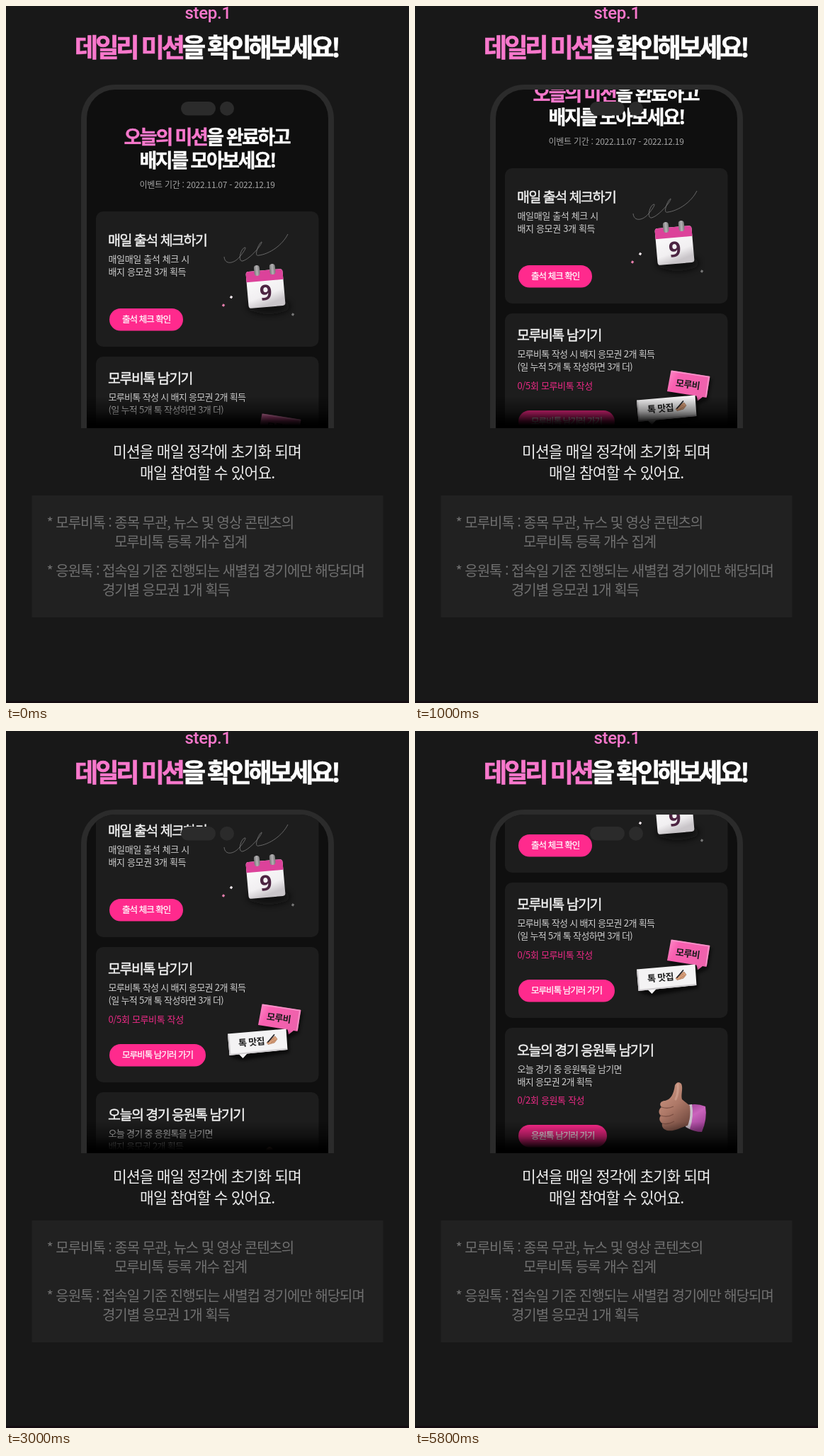
Write an HTML page that moves like this. It is 569x984 px and loops after 7 s.

```html
<!DOCTYPE html>
<html lang="ko">
<head>
<meta charset="utf-8">
<title>Daily mission</title>
<style>
  html, body { margin: 0; width: 100%; height: 100%; overflow: hidden; background: #181818; }
  svg { display: block; width: 569px; height: 984px; }
  text { font-family: "Noto Sans CJK KR", "Noto Sans CJK", "Noto Sans CJK JP", sans-serif; white-space: pre; }
  .step { font: 500 24px Roboto, sans-serif; letter-spacing: -.3px; fill: #f878cc; }
  .head { font-size: 36px; font-weight: 900; letter-spacing: -3.95px; fill: #fff; stroke: #fff; stroke-width: .7px; }
  .sub { font-size: 27px; font-weight: 900; letter-spacing: -2.5px; fill: #fff; stroke: #fff; stroke-width: .4px; }
  .pink { fill: #f878cc; stroke: #f878cc; }
  .date { font-size: 12px; font-weight: 350; letter-spacing: -.26px; fill: #a3a3a3; }
  .title { font-size: 19.5px; font-weight: 500; letter-spacing: -1.5px; fill: #f4f4f4; stroke: #f4f4f4; stroke-width: .4px; }
  .desc { font-size: 13px; font-weight: 350; letter-spacing: -.67px; fill: #cfcfcf; }
  .wide { letter-spacing: -.35px; }
  .count { font-size: 13px; font-weight: 400; letter-spacing: -.35px; fill: #ec2a86; }
  .btn { font-size: 12.5px; font-weight: 500; letter-spacing: -.95px; fill: #fff; stroke: #fff; stroke-width: .25px; }
  .tag { font-size: 13px; font-weight: 700; letter-spacing: -.6px; fill: #1c1c1c; }
  .nine { font: 700 30px "Noto Sans", sans-serif; fill: #4c2442; }
  .caption { font-size: 21.5px; font-weight: 350; letter-spacing: -.9px; fill: #ededed; }
  .note { font-size: 20px; font-weight: 350; letter-spacing: -1.05px; fill: #707070; }
</style>
</head>
<body>
<svg viewBox="0 0 569 984">
  <defs>
    <clipPath id="screen"><path d="M114 596V158a40 40 0 0 1 40-40H415a40 40 0 0 1 40 40V596Z"/></clipPath>
    <linearGradient id="fade" x2="0" y2="1">
      <stop offset="0" stop-color="#000" stop-opacity="0"/>
      <stop offset=".5" stop-color="#000" stop-opacity=".42"/>
      <stop offset=".85" stop-color="#000" stop-opacity=".88"/>
      <stop offset="1" stop-color="#000"/>
    </linearGradient>
    <linearGradient id="paper" x2=".3" y2="1">
      <stop offset="0" stop-color="#fff"/><stop offset=".75" stop-color="#f1eff1"/><stop offset="1" stop-color="#c9c5c9"/>
    </linearGradient>
    <linearGradient id="rose" x2="1" y2=".4">
      <stop offset="0" stop-color="#ff93cb"/><stop offset=".3" stop-color="#f95fb0"/><stop offset="1" stop-color="#ee62ac"/>
    </linearGradient>
    <linearGradient id="ring" x2="1">
      <stop offset="0" stop-color="#777"/><stop offset=".5" stop-color="#b5b3b5"/><stop offset="1" stop-color="#777"/>
    </linearGradient>
    <linearGradient id="skin" x1=".2" y1="0" x2=".75" y2="1">
      <stop offset="0" stop-color="#cf9a86"/><stop offset=".5" stop-color="#ad7867"/><stop offset="1" stop-color="#6d463c"/>
    </linearGradient>
    <linearGradient id="cuff" x2=".4" y2="1">
      <stop offset="0" stop-color="#9c3f93"/><stop offset=".45" stop-color="#cb64bd"/><stop offset="1" stop-color="#9c3f93"/>
    </linearGradient>
    <filter id="soft" x="-50%" y="-50%" width="200%" height="200%"><feGaussianBlur stdDeviation="5"/></filter>
    <filter id="blur" x="-30%" y="-30%" width="160%" height="160%"><feGaussianBlur stdDeviation="2"/></filter>
  </defs>

  <rect width="569" height="984" fill="#181818"/>
  <rect y="981" width="569" height="3" fill="#140c11"/>
  <text class="step" x="252.5" y="17.5">step.1</text>
  <text class="head" x="97" y="71.5"><tspan class="pink">데일리 미션</tspan>을 확인해보세요!</text>

  <path d="M106 596V159a48 48 0 0 1 48-48H415a48 48 0 0 1 48 48V596Z" fill="#2b2b2b"/>
  <g clip-path="url(#screen)">
    <rect x="114" y="118" width="341" height="478" fill="#0f0f0f"/>
    <g id="page">
      <text class="sub" x="166.5" y="195"><tspan class="pink">오늘의 미션</tspan>을 완료하고</text>
      <text class="sub" x="188.5" y="227.5">배지를 모아보세요!</text>
      <text class="date" x="188.5" y="256.5">이벤트 기간 : 2022.11.07 - 2022.12.19</text>
      <g id="cards"></g>

      <g id="calendar">
        <path d="M308 354C309 366 322 364 330 354C336 347 340 340 337 341C331 343 327 361 334 360C345 357 362 336 361 333C357 334 349 355 357 352C372 350 390 338 398 322" fill="none" stroke="#7c7c7c" stroke-width=".8"/>
        <ellipse cx="371" cy="424" rx="30" ry="11" fill="#090909" opacity=".8" filter="url(#soft)"/>
        <g transform="translate(366.5 399) rotate(-5)">
          <rect x="-26" y="-26" width="52" height="52" rx="4" fill="url(#paper)"/>
          <path d="M-26 -11V-22a4 4 0 0 1 4-4H22a4 4 0 0 1 4 4V-11Z" fill="#dc429a"/>
          <rect x="-14" y="-34" width="8" height="15" rx="4" fill="url(#ring)"/>
          <rect x="8" y="-34" width="8" height="15" rx="4" fill="url(#ring)"/>
          <text class="nine" x="0" y="16" text-anchor="middle">9</text>
        </g>
        <rect x="-1.6" y="-1.6" width="3.2" height="3.2" fill="#f3e9ee" transform="translate(318 411) rotate(35)"/>
        <rect x="-1.6" y="-1.6" width="3.2" height="3.2" fill="#e87fae" transform="translate(307 422.5) rotate(35)"/>
        <rect x="-1.6" y="-1.6" width="3.2" height="3.2" fill="#777" transform="translate(405 435.5) rotate(35)"/>
      </g>

      <g id="bubbles" transform="translate(0 137)">
        <path d="M363 442L419 450L414 480L402 486L358 472Z" fill="#000" opacity=".55" filter="url(#blur)"/>
        <path d="M361.5 438.5L416.5 447L411.5 477L406 476L399 481.5L397.5 474.5L356 468Z" fill="url(#rose)"/>
        <path d="M362.5 439.5L415 447.5L411 475.5" fill="none" stroke="#ffa3d3" stroke-width="2" opacity=".7"/>
        <text class="tag" transform="translate(385 458) rotate(8)" y="4.8" text-anchor="middle">모루비</text>
        <path d="M316 484L399 478L400 507L335 518L318 514Z" fill="#000" opacity=".65" filter="url(#blur)"/>
        <path d="M313 480.5L395.5 473.5L397.5 503L340.5 508.5L334.5 515L329 509.5L315.5 511Z" fill="#f4f3f4"/>
        <path d="M314 482L316.5 510L396.5 502" fill="none" stroke="#cfcccf" stroke-width="2"/>
        <text class="tag" transform="translate(346.5 492) rotate(-5)" y="4.8" text-anchor="middle">톡 맛집</text>
        <path d="M368 493L374 487L380 484L383 488L379 493L370 495.5Z" fill="#d9a07c" stroke="#a8714f" stroke-width=".7" stroke-linejoin="round"/>
        <path d="M373 490L379 487M374 493L381 489" stroke="#a8714f" stroke-width=".7"/>
        <path d="M370 492L378.5 482" stroke="#27262b" stroke-width="1.8" stroke-linecap="round"/>
      </g>

      <g id="thumb" transform="translate(0 281)">
        <path d="M386 528Q398 525 410 530Q413 547 405 566Q394 566 384 560Z" fill="url(#cuff)"/>
        <path d="M385 528L391 527Q394 544 388 562L382 559Z" fill="#c9bfca"/>
        <path d="M367 500Q371 493 376 498C379 504 375 514 377 520L388 529Q390 545 385 557C376 559 367 566 356 564C350 562 348 558 349 554C345 551 344 547 347 543C343 539 344 534 348 531C344 527 347 522 353 522C361 520 365 514 367 500Z" fill="url(#skin)"/>
        <path d="M348 531Q357 534 365 530M347 543Q357 546 365 541M349 554Q358 556 366 551" fill="none" stroke="#6d443a" stroke-width="1.2" opacity=".75"/>
        <path d="M371 499Q372 512 368 520" fill="none" stroke="#e3b5a3" stroke-width="3" stroke-linecap="round" opacity=".45"/>
      </g>
    </g>
    <rect x="114" y="552" width="341" height="40" fill="url(#fade)"/>
    <rect x="114" y="592" width="341" height="4"/>
  </g>
  <rect x="247" y="135" width="49" height="19.5" rx="9.75" fill="#2b2b2b"/>
  <circle cx="312" cy="144.8" r="10" fill="#2b2b2b"/>

  <text class="caption" x="151" y="637">미션을 매일 정각에 초기화 되며</text>
  <text class="caption" x="189" y="667">매일 참여할 수 있어요.</text>
  <rect x="36.5" y="691" width="496" height="172" fill="#212121"/>
  <text class="note" x="57.5" y="736.5">* 모루비톡 : 종목 무관, 뉴스 및 영상 콘텐츠의</text>
  <text class="note" x="153" y="764">모루비톡 등록 개수 집계</text>
  <text class="note" x="57.5" y="804.5">* 응원톡 : 접속일 기준 진행되는 새별컵 경기에만 해당되며</text>
  <text class="note" x="136" y="832">경기별 응모권 1개 획득</text>
</svg>
<script>
  const cards = [
    { title: '매일 출석 체크하기', lines: ['매일매일 출석 체크 시', '배지 응모권 3개 획득'],
      button: '출석 체크 확인', width: 104, top: 41, wide: ' wide' },
    { title: '모루비톡 남기기', lines: ['모루비톡 작성 시 배지 응모권 2개 획득', '(일 누적 5개 톡 작성하면 3개 더)'],
      count: '0/5회 모루비톡 작성', button: '모루비톡 남기러 가기', width: 136, top: 31 },
    { title: '오늘의 경기 응원톡 남기기', lines: ['오늘 경기 중 응원톡을 남기면', '배지 응모권 2개 획득'],
      count: '0/2회 응원톡 작성', button: '응원톡 남기러 가기', width: 125, top: 31.5 }
  ];

  const label = (cls, x, y, str) => `<text class="${cls}" x="${x}" y="${y}">${str}</text>`;

  const drawCard = (c, i) => {
    const y = 290 + 205 * i;
    const mid = y + c.top;
    return `<rect x="127" y="${y}" width="314.5" height="191" rx="10" fill="#1d1d1d"/>` +
      label('title', 144, mid + 7, c.title) +
      c.lines.map((s, n) => label('desc' + (c.wide || ''), 144.5, mid + 31 + 18.3 * n, s)).join('') +
      (c.count ? label('count', 144.5, y + 107, c.count) : '') +
      `<rect x="146" y="${y + 137}" width="${c.width}" height="31.5" rx="15.75" fill="#ff2a8d"/>` +
      label('btn', 164, y + 157, c.button);
  };
  document.getElementById('cards').innerHTML = cards.map(drawCard).join('');

  // [start ms, scroll px]; each position holds until the next
  const LOOP = 7000;
  const stops = [[0, 0], [1000, 61], [2000, 137], [3000, 190], [4000, 281], [LOOP, 281]];
  document.getElementById('page').animate(
    stops.map(([ms, px]) => ({ offset: ms / LOOP, transform: `translateY(${-px}px)`, easing: 'step-end' })),
    { duration: LOOP, iterations: Infinity }
  );
</script>
</body>
</html>
```
